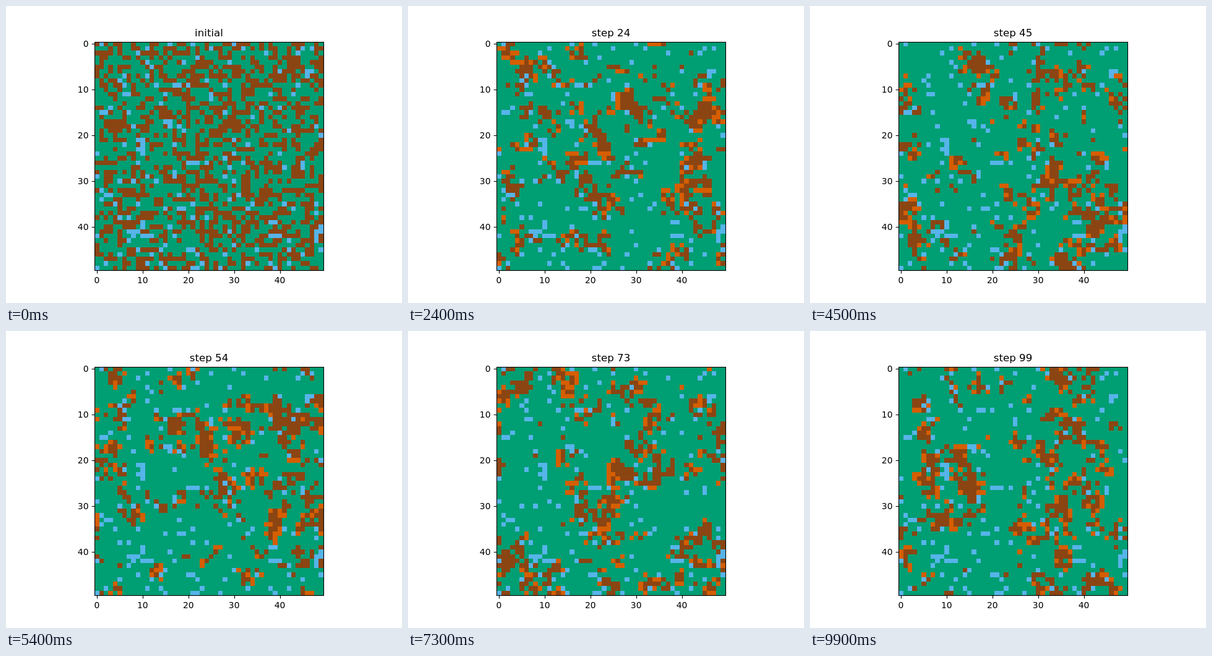
An HTML page with a canvas that plays this animation: 640x480 px, repeating every 10000 ms.

```html
<!DOCTYPE html>
<html lang="en">
<head>
<meta charset="utf-8">
<title>Forest fire model</title>
<style>
  html, body { margin: 0; width: 100%; height: 100%; overflow: hidden; background: #fff; }
  canvas, svg { position: absolute; left: 0; top: 0; display: block; }
  text { font: 13.89px "DejaVu Sans", sans-serif; }
  #title { font-size: 16.67px; }
</style>
</head>
<body>
<canvas id="map" width="640" height="480"></canvas>
<svg id="axes" width="640" height="480" viewBox="0 0 640 480">
  <rect x="143.5" y="58.5" width="370" height="369" fill="none" stroke="#000" stroke-width="1.11"/>
  <text id="title" x="328" y="49" text-anchor="middle">initial</text>
</svg>
<script>
const SIZE = 50, STEPS = 100, STEP_MS = 100;
const LEFT = 143.2, TOP = 57.6, CELL = 7.392;
const BARE = 0, TREE = 1, FIRE = 2, WATER = 3;
const COLORS = ["#8b4513", "#009e73", "#d55e00", "#56b4e9"];

const WATER_CELLS = 165, BARE_SHARE = 0.41;
const BARE_LEVEL = 375, FIRE_LEVEL = 142;

// Fixed ponds as column, row, length; the other water is scattered.
const PONDS = [
  [1, 0, 1], [16, 0, 1], [30, 0, 1], [11, 1, 1], [25, 1, 1], [45, 1, 1], [47, 1, 1],
  [22, 3, 1], [11, 4, 1], [46, 6, 1], [46, 7, 1], [6, 7, 1], [5, 8, 1], [6, 9, 1],
  [17, 9, 2], [6, 11, 2], [25, 12, 1], [3, 14, 1], [1, 15, 2], [16, 18, 1], [18, 18, 1],
  [9, 21, 2], [10, 22, 1], [9, 23, 2], [0, 24, 1], [24, 26, 1], [17, 29, 1],
  [2, 33, 2], [18, 36, 2], [5, 38, 1], [24, 38, 1], [38, 39, 2], [16, 40, 1],
  [7, 41, 2], [48, 41, 2], [11, 42, 2], [38, 42, 3], [20, 45, 2]
];

function seeded(seed) {
  return () => {
    seed = (seed + 0x6d2b79f5) | 0;
    let t = Math.imul(seed ^ (seed >>> 15), 1 | seed);
    t = (t + Math.imul(t ^ (t >>> 7), 61 | t)) ^ t;
    return ((t ^ (t >>> 14)) >>> 0) / 4294967296;
  };
}
const random = seeded(4173);

function firstGrid() {
  const grid = Array.from({ length: SIZE * SIZE }, () => random() < BARE_SHARE ? BARE : TREE);
  for (const [col, row, length] of PONDS) {
    for (let i = 0; i < length; i++) grid[row * SIZE + col + i] = WATER;
  }
  let wet = count(grid, WATER);
  while (wet < WATER_CELLS) {
    const cell = Math.floor(random() * grid.length);
    if (grid[cell] !== WATER) { grid[cell] = WATER; wet++; }
  }
  return grid;
}

function count(grid, kind) {
  return grid.filter(cell => cell === kind).length;
}

// The map wraps around at its edges.
function neighbours(grid, cell, kind) {
  const col = cell % SIZE, row = (cell - col) / SIZE;
  let n = 0;
  for (let dy = -1; dy <= 1; dy++) {
    for (let dx = -1; dx <= 1; dx++) {
      if (!dx && !dy) continue;
      const x = (col + dx + SIZE) % SIZE, y = (row + dy + SIZE) % SIZE;
      if (grid[y * SIZE + x] === kind) n++;
    }
  }
  return n;
}

// Weighted draw without replacement.
function pick(grid, kind, amount, weight) {
  const found = [];
  grid.forEach((value, cell) => {
    if (value === kind) found.push({ cell, key: -Math.log(1 - random()) / weight(cell) });
  });
  return found.sort((a, b) => a.key - b.key).slice(0, amount).map(item => item.cell);
}

// Fire spreads through trees, leaves bare ground, and trees grow back from the edges.
function advance(grid, step) {
  const burning = count(grid, FIRE), bare = count(grid, BARE);
  const sparks = Math.round(FIRE_LEVEL * Math.min(1, step / 5) * (0.92 + 0.16 * random()));
  const shoots = Math.max(0, Math.round(burning + 0.17 * (bare - BARE_LEVEL)));
  const lit = pick(grid, TREE, sparks, cell => 0.012 + neighbours(grid, cell, FIRE) ** 2);
  const grown = pick(grid, BARE, shoots, cell => 0.03 + neighbours(grid, cell, TREE) / 8);
  const next = grid.map(value => value === FIRE ? BARE : value);
  lit.forEach(cell => { next[cell] = FIRE; });
  grown.forEach(cell => { next[cell] = TREE; });
  return next;
}

const history = [firstGrid()];
for (let step = 1; step < STEPS; step++) history.push(advance(history[step - 1], step));

const axes = document.getElementById("axes");
const title = document.getElementById("title");
const ctx = document.getElementById("map").getContext("2d");

function addSvg(tag, attributes, text = "") {
  const node = document.createElementNS("http://www.w3.org/2000/svg", tag);
  for (const name in attributes) node.setAttribute(name, attributes[name]);
  node.textContent = text;
  axes.append(node);
}

const snap = value => Math.floor(value + 0.5) + 0.5;
for (let value = 0; value < SIZE; value += 10) {
  const offset = (value + 0.5) * CELL;
  const x = snap(LEFT + offset), y = snap(TOP + offset);
  addSvg("path", { d: `M${x} 427.5V432.4M143.5 ${y}H138.6`, stroke: "#000", "stroke-width": 1.11 });
  addSvg("text", { x: LEFT + offset, y: 448, "text-anchor": "middle" }, value);
  addSvg("text", { x: 133.5, y: y + 4.8, "text-anchor": "end" }, value);
}

const edge = (start, index) => Math.round(start + index * CELL);

function draw(step) {
  history[step].forEach((kind, cell) => {
    const col = cell % SIZE, row = Math.floor(cell / SIZE);
    const x = edge(LEFT, col), y = edge(TOP, row);
    ctx.fillStyle = COLORS[kind];
    ctx.fillRect(x, y, edge(LEFT, col + 1) - x, edge(TOP, row + 1) - y);
  });
  title.textContent = step ? `step ${step}` : "initial";
}

const start = performance.now();
let shown = -1;
function tick() {
  const step = Math.floor((performance.now() - start) / STEP_MS) % STEPS;
  if (step !== shown) draw(shown = step);
  requestAnimationFrame(tick);
}
tick();
</script>
</body>
</html>
```
